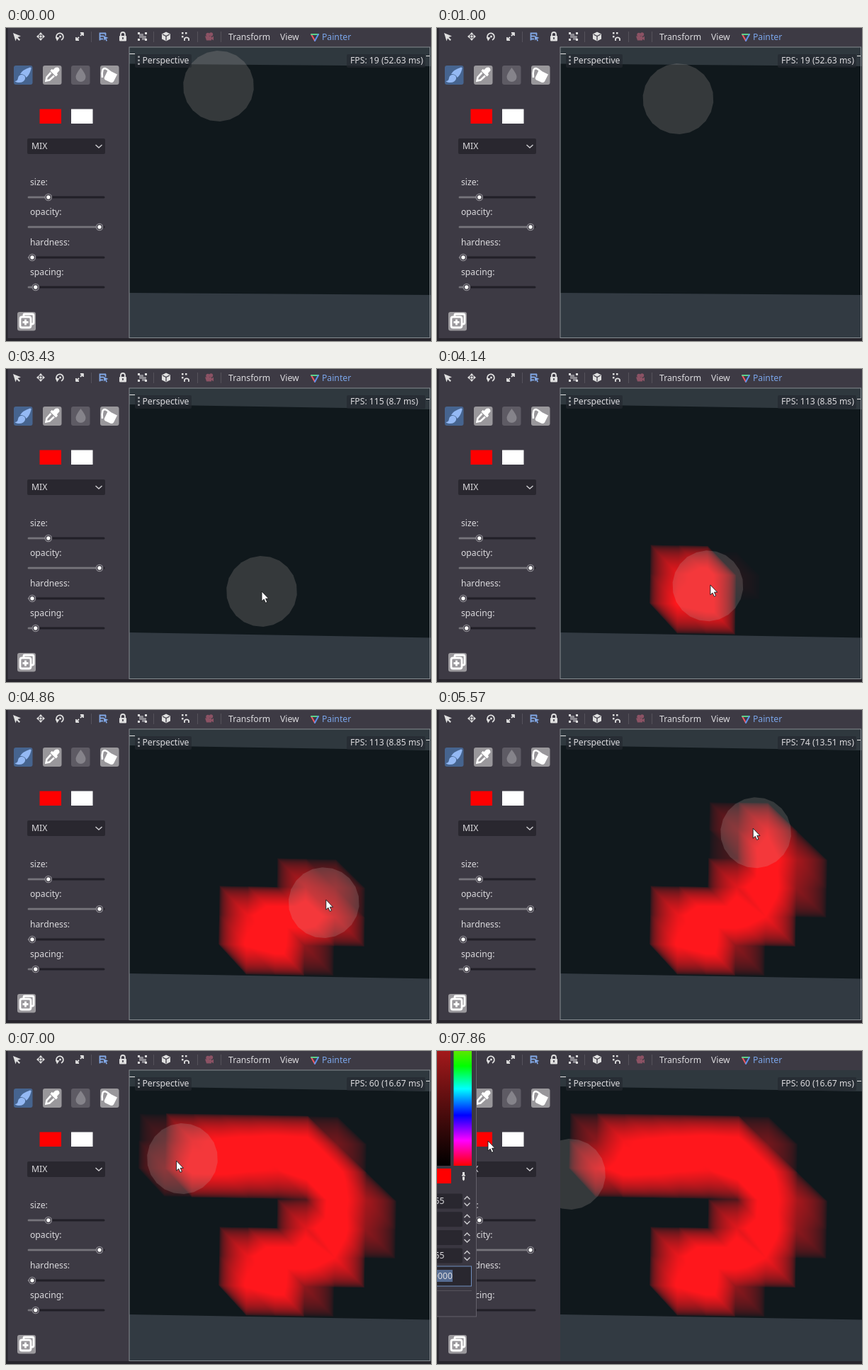
Animation, 600 px wide and 442 px high, one loop 8 s. Source, as an HTML page with a canvas:

```html
<!DOCTYPE html>
<html lang="en">
<head>
<meta charset="utf-8">
<title>Vertex painter</title>
<style>
html, body { margin: 0; width: 100%; height: 100%; overflow: hidden; background: #3d3a44; }
canvas, svg { position: absolute; left: 0; top: 0; width: 100vw; height: 100vh; display: block; }
text { font: 12.2px "Noto Sans", "Open Sans", sans-serif; fill: #dcdbde; white-space: pre; }
.ico { fill: none; stroke: #e0e0e0; stroke-width: 1.8; stroke-linejoin: round; }
.thin { fill: none; stroke: #cfced2; stroke-width: 1.4; }
.solid { fill: #e0e0e0; }
.field { fill: #29272f; }
.track { stroke: #211f27; stroke-width: 3; stroke-linecap: round; }
.fill { stroke: #77757c; stroke-width: 3; stroke-linecap: round; }
</style>
</head>
<body>
<canvas id="view" width="600" height="442"></canvas>
<svg viewBox="0 0 600 442" preserveAspectRatio="none">
  <defs>
    <linearGradient id="hue" x1="0" y1="0" x2="0" y2="1">
      <stop offset="0" stop-color="#5ce600"/>
      <stop offset=".13" stop-color="#0f0"/>
      <stop offset=".33" stop-color="#0ff"/>
      <stop offset=".56" stop-color="#00f"/>
      <stop offset=".78" stop-color="#f0f"/>
      <stop offset="1" stop-color="#f00"/>
    </linearGradient>
    <linearGradient id="shade" x1="0" y1="0" x2="0" y2="1">
      <stop offset="0" stop-color="#a3191b"/>
      <stop offset="1" stop-color="#000"/>
    </linearGradient>
    <path id="spin" class="thin" d="M38.500 -2.500l4-4 4 4M38.500 2.500l4 4 4-4"/>
  </defs>

  <!-- panel -->
  <path fill="#3d3a44" d="M0 0H600V27H174V438H0Z"/>
  <path fill="#27252c" d="M0 0H2.500V438H600V442H0Z"/>
  <path stroke="#55525b" d="M120.500 5v15M208.500 5v15M270.500 5v15M303.500 5v15"/>

  <!-- toolbar -->
  <path class="solid" d="M10 7l11 4.500-4.500 1.500 3.500 3.500-1.500 1.500-3.500-3.500-1.500 4z"/>
  <path class="solid" d="M49 6l3 3.500h-6zM49 18l3-3.500h-6zM43 12l3.500-3v6zM55 12l-3.500-3v6z"/>
  <circle class="solid" cx="49" cy="12" r="1.700"/>
  <path class="ico" d="M73 16.500a5 5 0 1 1 5 .5"/>
  <path class="solid" d="M70 12.500l5.500 1-3.500 5z"/>
  <circle class="solid" cx="76.500" cy="12" r="1.500"/>
  <path class="ico" d="M105 7h4v4M103 17h-4v-4M100 16l3-3M105 11l3-3"/>
  <g stroke="#82a8e6" fill="none" stroke-width="1.800">
    <path d="M132 7.500h9M132 11.500h6M132 15.500h5M132.500 6.500v11M140.500 7v4"/>
    <path fill="#82a8e6" stroke="none" d="M138 11l6.500 3-3 1 1.500 3-1.500.700-1.500-3-2 2z"/>
  </g>
  <rect class="solid" x="160" y="11" width="10" height="7.500" rx="1"/>
  <path class="ico" d="M162 11v-2a3 3 0 0 1 6 0v2"/>
  <path stroke="#3d3a44" stroke-width="1.600" d="M165 13v3"/>
  <path fill="#8b8990" d="M188 8h6v6h-6zM192 11h6v6h-6z"/>
  <path class="solid" d="M186 6h3v3h-3zM196 6h3v3h-3zM186 15h3v3h-3zM196 15h3v3h-3z"/>
  <path class="solid" d="M226 5.500l6 3v7l-6 3-6-3v-7z"/>
  <path stroke="#3d3a44" fill="none" stroke-width="1.300" d="M221 9l5 2.500 5-2.500M226 11.500v6"/>
  <path class="ico" d="M252 18v-3a3.500 3.500 0 0 1 6 0v3"/>
  <path class="solid" d="M248 6h2.500v2.500H248zM253 6h2.500v2.500H253zM248 11h2.500v2.500H248z"/>
  <g fill="#8c5264">
    <circle cx="285" cy="9.500" r="2.700"/><circle cx="289.500" cy="9" r="2.700"/>
    <path d="M281 11.500h9v6h-7zM290 13.500l3-2v6l-3-2z"/>
  </g>
  <text x="314" y="17">Transform</text>
  <text x="387" y="17">View</text>
  <g fill="none" stroke-width="2" stroke-linecap="round">
    <path stroke="#ee5a62" d="M431 9L436 18"/>
    <path stroke="#5bd08a" d="M431 9H441"/>
    <path stroke="#5d92ee" d="M441 9L436 18"/>
  </g>
  <text x="446" y="17" style="fill:#7ba6ea">Painter</text>

  <!-- brush tools -->
  <rect x="11" y="53" width="26.500" height="27" rx="3" fill="#46648f"/>
  <g fill="#94b9f4">
    <path d="M12.500 75q4 0 4.500-4.500 1-5 6-4.500 5 1 4 6-2 5-8 5-5 0-6.500-2z"/>
    <path d="M20 65q3-6 14-9.500 2 0 1.500 2Q33 67 28.500 70q-2-5-8.500-5z"/>
  </g>
  <rect x="52" y="53" width="26.500" height="27" rx="3" fill="#99979b"/>
  <path fill="#fff" d="M66.500 59l3-3q6-2 6 4l-3.500 4 1 2-2.500 2.500-8-8 2-2.500z"/>
  <path fill="none" stroke="#fff" stroke-width="2.600" d="M63.500 63l-6 6.500-1 5 5-1 6.500-6"/>
  <rect x="92" y="53" width="26.500" height="27" rx="3" fill="#5e5b64"/>
  <path fill="#85838a" d="M105.500 56q7 9 7 13a7 7 0 0 1-14 0q0-4 7-13z"/>
  <rect x="133" y="53" width="26.500" height="27" rx="3" fill="#99979b"/>
  <path fill="#fff" d="M144 59l13 6.500-5 10q-2 2.500-5 1l-6.500-3q-2.500-1.500-1.500-4z"/>
  <path fill="none" stroke="#fff" stroke-width="2.600" d="M147 62q-8-8-10.500-3-1.500 5-.5 11"/>

  <rect x="47.500" y="114.500" width="30.500" height="20.500" fill="#f00"/>
  <rect x="92" y="114.500" width="30.500" height="20.500" fill="#fff"/>
  <rect class="field" x="30" y="156" width="110" height="22" rx="2"/>
  <text x="36" y="171">MIX</text>
  <path class="thin" d="M126.500 165l4.500 4 4.500-4"/>
  <g id="sliders"></g>

  <rect x="16" y="401" width="26" height="26.500" rx="3" fill="#9a989c"/>
  <g fill="none" stroke="#fff" stroke-width="2.800">
    <path d="M25 407v-2q0-1 1-1h11q2 0 2 2v10q0 2-2 2h-1"/>
    <rect x="20" y="408" width="15" height="15" rx="2.500"/>
    <path d="M27.500 411.500v8M23.500 415.500h8"/>
  </g>

  <!-- viewport labels -->
  <rect x="182" y="37" width="80" height="19" rx="2" fill="#24282f" fill-opacity=".65"/>
  <path stroke="#a9abae" stroke-width="2.500" stroke-dasharray="2.500 2.500" d="M187.500 39.500v13"/>
  <text x="192.500" y="50">Perspective</text>
  <rect x="481" y="37" width="111" height="19" rx="2" fill="#24282f" fill-opacity=".65"/>
  <text id="fps" x="486" y="50"></text>
  <rect id="frame" x="174" y="27" width="424.500" height="410.500" fill="none" stroke="#858b90"/>

  <!-- colour picker -->
  <g id="picker">
    <rect x="-4" y="-4" width="59.500" height="379" fill="#3a3741" stroke="#625f69"/>
    <rect width="19" height="162" fill="url(#shade)"/>
    <rect x="23.500" width="25.500" height="162" fill="url(#hue)"/>
    <rect y="166" width="20" height="21" fill="#f00"/>
    <path class="solid" d="M36 171h3v4h1v1.500h-5v-1.500h1zM36 177.500h3v4l-1.500 2-1.500-2z"/>
    <g id="spins"></g>
    <rect x="-4" y="304" width="52.500" height="28" class="field" stroke="#7090c0"/>
    <rect x="0" y="309" width="22" height="17" fill="#556b91"/>
    <text x="22" y="322" text-anchor="end">ff0000</text>
    <path stroke="#55525b" d="M0 338.500h49"/>
  </g>

  <path id="cursor" fill="#fff" stroke="#16181a" stroke-width=".9" d="M0 0V14L3.200 11.200 5.400 16.300 7.800 15.200 5.600 10.300H9.800Z"/>
</svg>
<script>
const $ = id => document.getElementById(id);
const ctx = $('view').getContext('2d', { willReadFrequently: true });
const LOOP = 8000, STEP = 1000 / 7;

const sliders = { size: .24, opacity: 1, hardness: 0, spacing: .05 };
$('sliders').innerHTML = Object.entries(sliders).map(([name, v], i) => {
  const y = 222 + Math.round(i * 42.4), ty = y + 17, x = 37 + 95 * v;
  return `<text x="34" y="${y}">${name}:</text>
    <path class="track" d="M32 ${ty}H138"/><path class="fill" d="M32 ${ty}H${x}"/>
    <circle cx="${x}" cy="${ty}" r="4.600" fill="#3a3740" stroke="#8a888f" stroke-width="1.400"/>
    <circle cx="${x}" cy="${ty}" r="2.700" fill="#fff"/>`;
}).join('');

$('spins').innerHTML = ['255', '0', '0', '255'].map((v, i) => {
  const y = 212 + i * 25.7;
  return `<rect class="field" x="-4" y="${y - 10.5}" width="40" height="21" rx="2"/>
    <text x="${v === '0' ? -8 : 10.5}" y="${y + 3.5}" text-anchor="end">${v}</text>
    <use href="#spin" y="${y}"/>`;
}).join('');

// hand movement: time, x, y
const path = [[140, 300, 82], [1140, 347, 103], [1429, 291, 152], [2000, 291, 152],
  [3200, 361, 314], [3900, 361, 314], [4400, 405, 298], [4860, 449, 272], [5290, 481, 225],
  [5600, 447, 168], [5860, 428, 148], [6140, 389, 142], [7000, 249, 152], [7290, 188, 174],
  [7571, 72, 127]];
const SHOWN = 2000, PRESS = 3580, RELEASE = 7080, EXIT = 7290, LEAD = 40;
const rates = [[0, 19], [2000, 18], [3000, 115], [4000, 113], [5400, 74], [6500, 60]];

function at(t) {
  const i = path.findIndex(k => k[0] > t);
  if (i < 1) return path[i ? path.length - 1 : 0].slice(1);
  const [t0, x0, y0] = path[i - 1], [t1, x1, y1] = path[i], f = (t - t0) / (t1 - t0);
  return [x0 + (x1 - x0) * f, y0 + (y1 - y0) * f];
}

function poly(pts, fill) {
  ctx.beginPath();
  pts.forEach(([x, y]) => ctx.lineTo(x, y));
  ctx.fillStyle = fill;
  ctx.fill();
}

// wall mesh: slightly rolled, with spacing that widens to the right and down
const ROLL = .018, RADIUS = 49.5, FLOW = .3;
const bend = (k, b, c) => b * k + c * k * k;
const unbend = (d, b, c) => (Math.sqrt(b * b + 4 * c * d) - b) / (2 * c);
const XB = [39.8, .3], YB = [40.84, .275];
const mesh = [];
for (let j = -6; j <= 5; j++) {
  const row = [];
  for (let i = -5; i <= 8; i++) {
    const x = 300 + bend(i, ...XB), y = 249 + bend(j, ...YB);
    row.push({ x: x - ROLL * (y - 290), y: y + ROLL * (x - 380), left: 1 });
  }
  mesh.push(row);
}

function dab(x, y) {
  for (const p of mesh.flat()) {
    const f = 1 - Math.hypot(p.x - x, p.y - y) / RADIUS;
    if (f > 0) p.left *= 1 - FLOW * f * f;
  }
}

function paint(t) {
  if (t < PRESS) return;
  mesh.flat().forEach(p => p.left = 1);
  for (let s = PRESS; s <= Math.min(t, RELEASE); s += 20) dab(...at(s));
  const cov = mesh.map(row => row.map(p => 1 - p.left));
  const X = 176, Y = 80, W = 384, H = 302, img = ctx.getImageData(X, Y, W, H);
  for (let y = 0; y < H; y++) for (let x = 0; x < W; x++) {
    const px = x + X, py = y + Y;
    const u = unbend(px - 300 + ROLL * (py - 290), ...XB) + 5;
    const v = unbend(py - 249 - ROLL * (px - 380), ...YB) + 6;
    const i = Math.floor(u), j = Math.floor(v), fx = u - i, fy = v - j;
    const a = cov[j], b = cov[j + 1];
    if (!a || !b) continue;
    // two triangles per quad
    const c = fx > fy
      ? a[i] * (1 - fx) + a[i + 1] * (fx - fy) + b[i + 1] * fy
      : a[i] * (1 - fy) + b[i] * (fy - fx) + b[i + 1] * fx;
    if (c > .002) {
      const p = (y * W + x) * 4;
      img.data[p] = 255 * Math.pow(Math.min(1, c * 1.5), 1 / 2.2);
      img.data[p + 1] = 23;
      img.data[p + 2] = 28;
    }
  }
  ctx.putImageData(img, X, Y);
}

function room(t) {
  const [top0, top1, low0, low1] = t < SHOWN ? [50.5, 54, 374, 377] : [50, 57, 372, 379.5];
  ctx.fillStyle = '#10181c';
  ctx.fillRect(173, 27, 427, 411);
  paint(t);
  poly([[173, 27], [600, 27], [600, top1], [173, top0]], '#2f383e');
  poly([[173, low0], [600, low1], [600, 438], [173, 438]], '#323a42');
  ctx.fillStyle = '#e6e6e6';
  ctx.fillRect(174, Math.round(top0 - 14.5), 8, 1);
  ctx.fillRect(593, Math.round(top1 - 15), 6, 1);
}

function brush(t) {
  const [x, y] = at(Math.min(t, EXIT)), pts = [];
  for (let a = 0; a < 22; a++) {
    const r = a * Math.PI / 11 + .1;
    pts.push([x + 50 * Math.cos(r), y + 50 * Math.sin(r)]);
  }
  poly(pts, 'rgba(200,190,185,.2)');
}

function show(id, on) {
  $(id).style.display = on ? '' : 'none';
}

let last = -1;
function draw(n) {
  const t = n * STEP;
  room(t);
  brush(t);
  const fps = rates.filter(r => r[0] <= t).pop()[1];
  $('fps').textContent = `FPS: ${fps} (${+(1000 / fps).toFixed(2)} ms)`;
  $('cursor').setAttribute('transform', `translate(${at(t + LEAD)})`);
  show('cursor', t >= SHOWN);
  show('frame', t < 7700);
  show('picker', t > 7850);
}

function tick(now) {
  // frame times are rounded to 10 ms
  const n = Math.floor((now % LOOP + 3) / STEP) % 56;
  if (n !== last) draw(last = n);
  requestAnimationFrame(tick);
}
draw(0);
requestAnimationFrame(tick);
</script>
</body>
</html>
```
